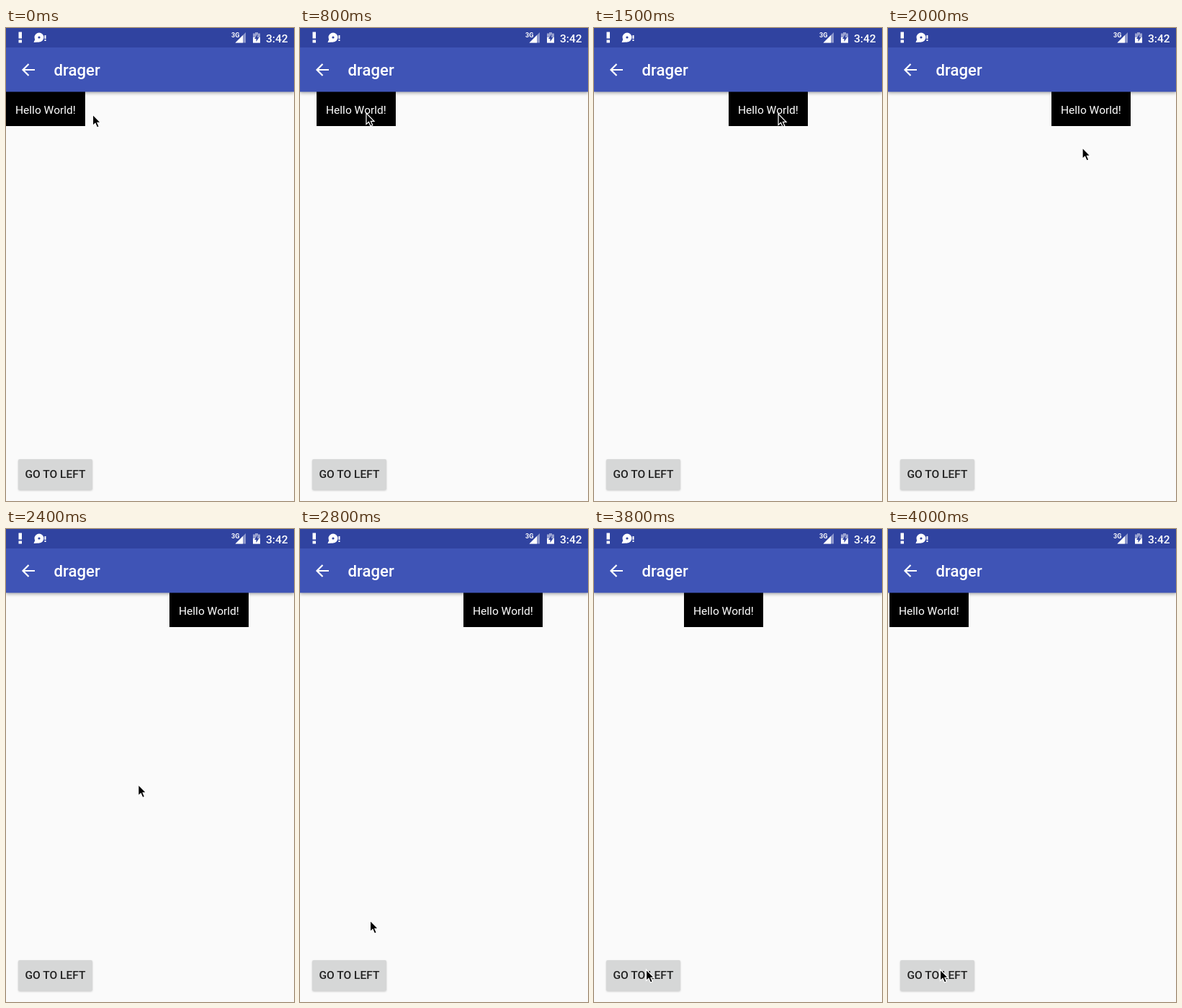
An HTML page that plays this animation: 400 px wide and 656 px high, repeating every 4100 ms.

```html
<!DOCTYPE html>
<html lang="en">
<head>
<meta charset="utf-8">
<title>drager</title>
<style>
  html, body { margin: 0; width: 100%; height: 100%; overflow: hidden; background: #fafafa; }
  svg { display: block; }
  text { font: 500 15.56px Roboto, sans-serif; fill: #fff; }
  #bar { filter: drop-shadow(0 2px 2px rgba(0, 0, 0, .3)); }
  #button { fill: #d6d7d7; filter: drop-shadow(0 1px 1px rgba(0, 0, 0, .2)); }
  #button.pressed { fill: #d2d3d3; filter: drop-shadow(0 4px 3px rgba(0, 0, 0, .3)); }
</style>
</head>
<body>
<svg width="400" height="656" viewBox="0 0 400 656">
  <g id="box">
    <rect y="88" width="110" height="48"/>
    <text x="13" y="119" style="font-weight:400">Hello World!</text>
  </g>

  <rect id="bar" y="27" width="400" height="61.5" fill="#3f54b6"/>
  <rect width="400" height="27" fill="#3043a0"/>
  <path d="M40 58H24M31.5 50L23.5 58L31.5 66" fill="none" stroke="#fff" stroke-width="2.2"/>
  <text x="66.5" y="66.3" style="font-size:22.2px">drager</text>

  <g fill="#fff">
    <path d="M17.5 5.5h4.5v9h-4.5zM17.5 16.5h4.5v4h-4.5z"/>
    <circle cx="46" cy="13" r="6.5"/>
    <path d="M38.5 20L41 14L46 19.5ZM53.5 10h2v5h-2zM53.5 16h2v2h-2z"/>
    <circle cx="46" cy="13" r="1.6" fill="#3043a0"/>
    <text x="313" y="12.5" style="font-size:9px;font-weight:700">3G</text>
    <path d="M333 6V20.5H318.5Z" opacity=".45"/>
    <path d="M329 10V20.5H318.5Z"/>
    <path d="M346 6h4v1.5h3v13h-10v-13h3Z" opacity=".5"/>
    <path d="M343 13h10v7.5h-10Z"/>
    <path d="M349.5 8.5L345 15h2.5v4L351.5 13H349Z" fill="#3043a0"/>
  </g>
  <text x="361" y="19.7">3:42</text>

  <rect id="button" x="17" y="598" width="103" height="42.5" rx="2"/>
  <text x="26.5" y="624" style="fill:#212121">GO TO LEFT</text>

  <path id="cursor" d="M0 0V15.5L3.5 12.3L6 18L8.8 16.8L6.4 11.3H11Z" stroke="#fff" stroke-width="1.2"/>
</svg>
<script>
const LOOP = 4100, STEP = 100;
const GRAB = 69, DROP = 227;
const RELEASE = 3755, SETTLE = 402;
const $ = id => document.getElementById(id);

// [time, x, y] of the pointer tip
const pointer = [
  [0, 120.5, 120], [100, 118, 120], [500, 69, 118], [650, 69, 118],
  [800, 92, 118], [1500, 256, 119], [1700, 296, 119], [1800, 296, 122],
  [2000, 270, 166], [2800, 97.5, 543], [3100, 72.5, 611], [LOOP, 72.5, 611]
];

function pointerAt(t) {
  const i = pointer.findIndex(p => p[0] > t);
  const [t0, x0, y0] = pointer[i - 1], [t1, x1, y1] = pointer[i];
  const k = (t - t0) / (t1 - t0);
  return [x0 + (x1 - x0) * k, y0 + (y1 - y0) * k];
}

function boxAt(t) {
  if (t < 650) return 0;
  if (t < 1700) return pointerAt(t)[0] - GRAB;
  const k = Math.min(1, Math.max(0, (t - RELEASE) / SETTLE));
  return DROP * (1 - k) ** 5;
}

function draw(now) {
  const t = Math.floor((now % LOOP) / STEP) * STEP;
  $("cursor").setAttribute("transform", `translate(${pointerAt(t)})`);
  $("box").setAttribute("transform", `translate(${Math.round(boxAt(t))})`);
  $("button").classList.toggle("pressed", t >= 3500 && t < 3800);
  requestAnimationFrame(draw);
}
draw(0);
</script>
</body>
</html>
```
